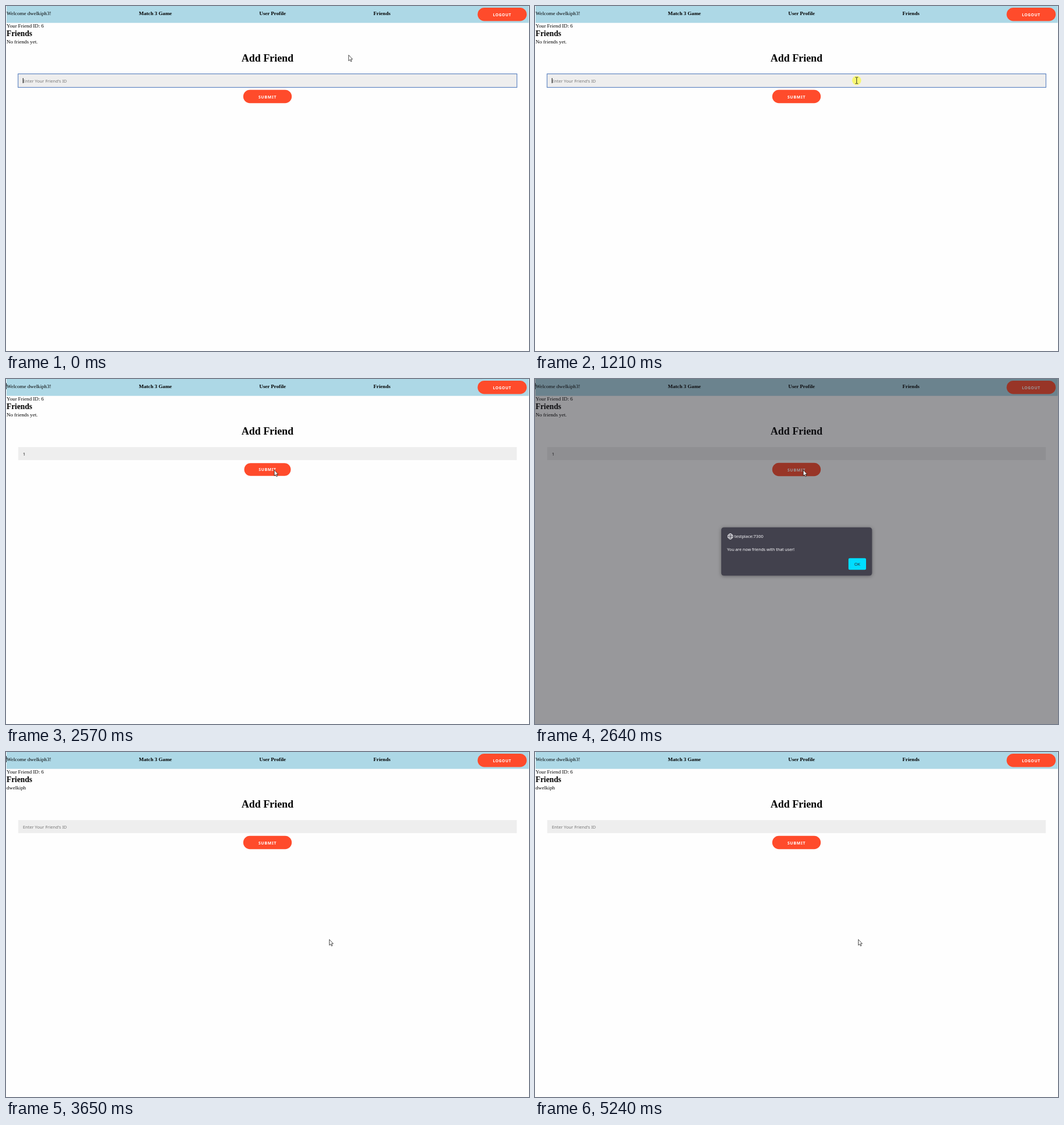
Recreate the animation shown at these times as an HTML page. Size 921 px wide and 608 px high, loop 5.71 s.

```html
<!DOCTYPE html>
<html lang="en">
<head>
<meta charset="utf-8">
<title>Add Friend</title>
<style>
  html, body { margin: 0; width: 100%; height: 100%; overflow: hidden; background: #fefefe; }
  svg { display: block; width: 921px; height: 608px; }
  text { white-space: pre; }
  .serif { font: 9.2px "Liberation Serif", serif; }
  .bold { font-weight: 700; }
  .h1 { font-size: 18.4px; }
  .h2 { font-size: 13.8px; }
  .sans { font: 7.6px "Noto Sans", sans-serif; }
  .label { font: 700 6.9px "Noto Sans", sans-serif; letter-spacing: .58px; fill: #fff; }
  .submit { font-size: 7.2px; letter-spacing: .7px; }
  .pill { fill: #ff4b2b; }
  .msg { font: 7.25px "Noto Sans", sans-serif; fill: #fbfbfe; }
  .host { font-size: 7.5px; font-weight: 500; }
  .globe { fill: none; stroke: #fbfbfe; stroke-width: .9; }
  #box { filter: drop-shadow(0 1px 3px rgba(0, 0, 0, .35)); }
</style>
</head>
<body>
<svg viewBox="0 0 921 608">
  <rect width="921" height="608" fill="#fefefe"/>

  <rect x="1" width="919.5" height="29.7" fill="#add8e6"/>
  <g class="serif">
    <text x="1" y="16">Welcome dwelkiph3!</text>
    <text class="bold" x="234" y="16">Match 3 Game</text>
    <text class="bold" x="446" y="16">User Profile</text>
    <text class="bold" x="647" y="16">Friends</text>
    <text x="1" y="38.4">Your Friend ID: 6</text>
    <text class="bold h2" x="1" y="53.4">Friends</text>
    <text id="list" x="1" y="66"></text>
    <text class="bold h1" x="414.8" y="98">Add Friend</text>
  </g>
  <rect id="navCaret" x="0" y="7" width="1" height="11" fill="#333"/>

  <rect class="pill" x="830.5" y="3" width="86.5" height="23.5" rx="11.75"/>
  <text class="label" x="857.4" y="17.5">LOGOUT</text>

  <rect x="21.5" y="120" width="878" height="23" fill="#eee"/>
  <rect id="focus" x="21.2" y="119.6" width="878.6" height="23.8" fill="none" stroke="#4470b8"/>
  <text id="value" class="sans" x="29.8" y="134.5"></text>
  <rect id="caret" y="127" width="1" height="9"/>

  <g id="submit">
    <rect class="pill" x="417.8" y="147.8" width="85.4" height="23.4" rx="11.7"/>
    <text class="label submit" x="444.4" y="162.5">SUBMIT</text>
  </g>

  <g id="dialog">
    <rect width="921" height="608" fill="rgba(28,27,34,.45)"/>
    <rect id="box" x="328" y="261.5" width="265.5" height="85" rx="4.6" fill="#42414d"/>
    <g class="globe">
      <circle cx="344" cy="277.4" r="4.6"/>
      <ellipse cx="344" cy="277.4" rx="2.1" ry="4.6"/>
      <path d="M339.6 275.8h8.8M339.6 279h8.8"/>
    </g>
    <text class="msg host" x="351" y="280">testplace:7300</text>
    <text class="msg" x="338.3" y="303">You are now friends with that user!</text>
    <rect id="ok" x="552" y="315.8" width="31" height="20.5" rx="2.3"/>
    <text class="sans" x="567.5" y="328.8" text-anchor="middle" fill="#2b2a33">OK</text>
  </g>

  <g id="pointer">
    <circle id="glow" r="8" fill="rgba(255,255,0,.52)"/>
    <path id="arrow" d="M.4.4V10.6L2.7 8.5 4.3 12 5.8 11.3 4.3 7.8H7.3Z"
          fill="#fff" stroke="#111" stroke-width=".75" stroke-linejoin="round"/>
    <path id="beam" d="M-2.5-5.5H-.6L0-5 .6-5.5H2.5M0-5V5M-2.5 5.5H-.6L0 5 .6 5.5H2.5"
          fill="none" stroke="#222" stroke-width=".9"/>
  </g>
</svg>
<script>
  const LOOP = 5710;
  const el = {};
  for (const node of document.querySelectorAll('[id]')) el[node.id] = node;

  // first change, last change, number of changes, start, bend, end
  const moves = [
    [590, 1140, 8, [603, 86], [590, 98], [567, 126]],
    [1210, 1340, 3, [568, 132], [565, 130.5], [562, 129]],
    [1750, 2240, 8, [562, 129], [500, 185], [472, 160]],
    [2960, 3450, 8, [472, 160], [560, 415], [569, 330]]
  ];

  const within = (t, a, b) => t >= a && t < b;
  const show = (node, on) => node.setAttribute('visibility', on ? 'inherit' : 'hidden');
  const ease = u => u * u * (3 - 2 * u);

  function pointerAt(t) {
    let at = moves[0][3];
    for (const [first, last, n, a, b, c] of moves) {
      if (t < first) break;
      const gap = (last - first) / (n - 1);
      const done = Math.min(n, Math.floor((t - first) / gap + 1e-6) + 1);
      const u = ease(done / n), v = 1 - u;
      at = a.map((p, i) => v * v * p + 2 * u * v * b[i] + u * u * c[i]);
    }
    return at;
  }

  function draw(t) {
    const [x, y] = pointerAt(t);
    const focused = t < 2370;
    const typed = within(t, 1680, 3650);
    const modal = within(t, 2640, 3650);
    const pressed = within(t, 3580, 3650);
    const overOk = x >= 552 && x <= 583 && y >= 316 && y <= 336;
    const overInput = !modal && y > 119.5 && y < 143.5;

    el.list.textContent = t < 3650 ? 'No friends yet.' : 'dwelkiph';
    el.value.textContent = typed ? '1' : "Enter Your Friend's ID";
    el.value.setAttribute('fill', typed ? '#111' : '#757575');
    el.caret.setAttribute('x', typed ? 34.4 : 29.6);
    show(el.caret, focused);
    show(el.focus, focused);
    show(el.navCaret, within(t, 2370, 4180) || within(t, 4710, 5240));

    const size = within(t, 2370, 2640) ? 0.96 : 1;
    el.submit.setAttribute('transform',
      `translate(460.5 159.5) scale(${size}) translate(-460.5 -159.5)`);

    show(el.dialog, modal);
    el.ok.setAttribute('fill', pressed ? '#aaf2ff' : overOk ? '#80ebff' : '#00ddff');

    el.pointer.setAttribute('transform', `translate(${x} ${y})`);
    show(el.arrow, !overInput);
    show(el.beam, overInput);
    show(el.glow, within(t, 1210, 1340) || within(t, 2370, 2570) || pressed);
  }

  const start = performance.now();
  function tick() {
    draw((performance.now() - start) % LOOP);
    requestAnimationFrame(tick);
  }
  tick();
</script>
</body>
</html>
```
